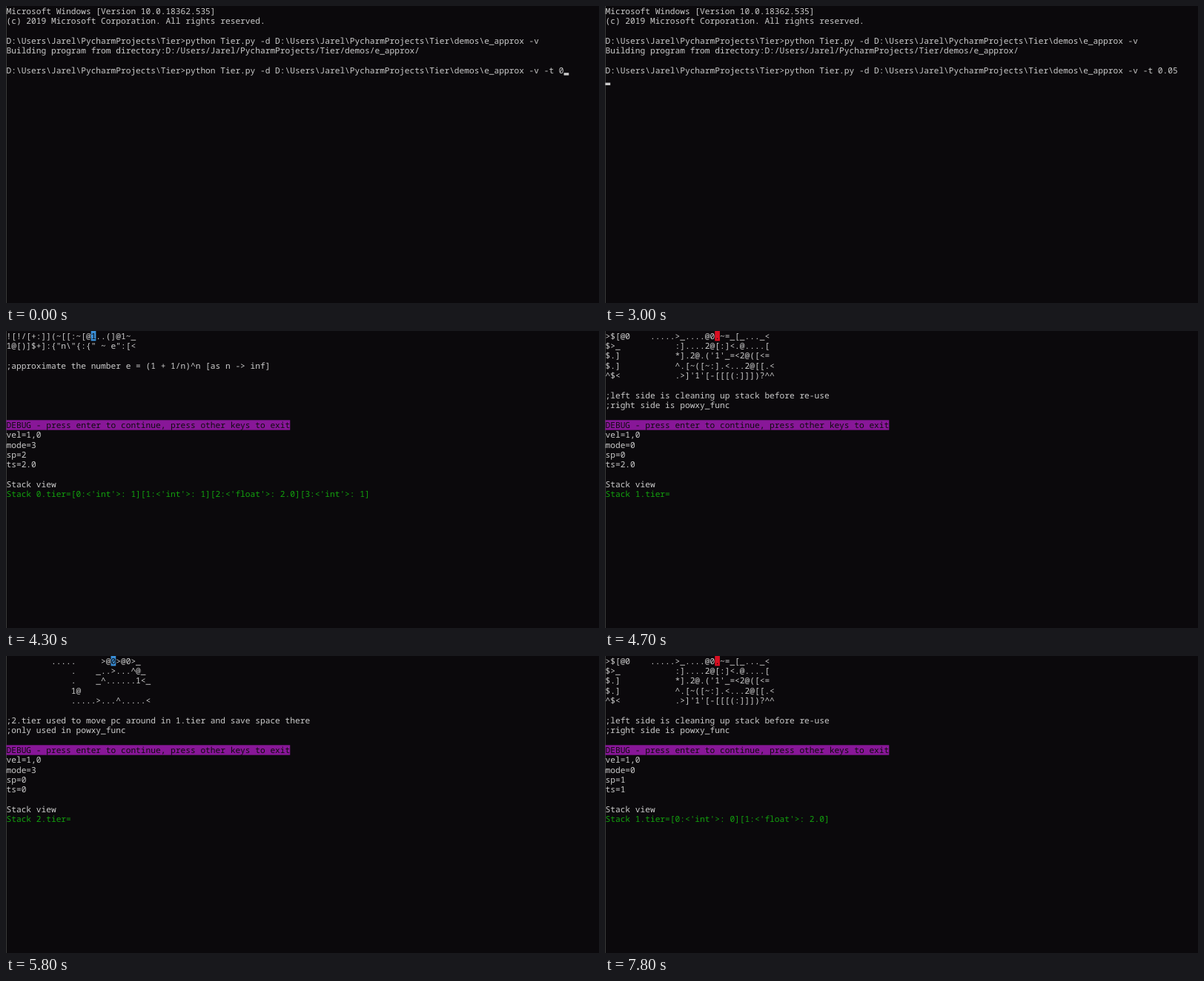
Write an HTML page with a canvas that moves like this. It is 800 by 401 pixels and loops after 8 s.

```html
<!DOCTYPE html>
<html lang="en">
<head>
<meta charset="utf-8">
<title>Tier debugger</title>
<style>
  html, body { margin: 0; width: 100%; height: 100%; overflow: hidden; background: #0b090c; }
  canvas { display: block; }
</style>
</head>
<body>
<canvas id="screen" width="800" height="401"></canvas>
<script>
const LOOP = 8000;
const CELL_W = 6.715, CELL_H = 401 / 30, LEFT = 0.5, BASELINE = 10.5;
const COLOR = {
  back: '#0b090c', edge: '#3a3a3a', text: '#cccccc', dark: '#0c0c0c',
  bar: '#881798', stack: '#13a10e', red: '#d90f22', blue: '#3a8fd8'
};

const ctx = document.getElementById('screen').getContext('2d');

const HOME = 'D:\\Users\\Jarel\\PycharmProjects\\Tier';
const COMMAND = `${HOME}>python Tier.py -d ${HOME}\\demos\\e_approx -v`;
const SHELL = [
  'Microsoft Windows [Version 10.0.18362.535]',
  '(c) 2019 Microsoft Corporation. All rights reserved.',
  '',
  COMMAND,
  `Building program from directory:${HOME.replaceAll('\\', '/')}/demos/e_approx/`
];

const pad = n => ' '.repeat(n);
const TIERS = [
  [
    '![!/[+:]](~[[:~[@1..(]@1~_',
    '1@[)]$+]:{"n\\"{:{" ~ e":[<',
    '',
    ';approximate the number e = (1 + 1/n)^n [as n -> inf]'
  ],
  [
    '>$[@0' + pad(4) + '.....>_....@0.~=_[_..._<',
    '$>_' + pad(11) + ':]....2@[:]<.@....[',
    '$.]' + pad(11) + "*].2@.('1'_=<2@([<=",
    '$.]' + pad(11) + '^.[~([~:].<...2@[[.<',
    '^$<' + pad(11) + ".>]'1'[-[[[(:]]])?^^",
    '',
    ';left side is cleaning up stack before re-use',
    ';right side is powxy_func'
  ],
  [
    pad(9) + '.....' + pad(5) + '>@0>@0>_',
    pad(13) + '.' + pad(4) + '_..>...^@_',
    pad(13) + '.' + pad(4) + '_^......1<_',
    pad(13) + '1@',
    pad(13) + '.....>...^.....<',
    '',
    ';2.tier used to move pc around in 1.tier and save space there',
    ';only used in powxy_func'
  ]
];

// Typed text and cursor blinks: [start, argument, cursor shown]
const TYPING = [
  [0, '0', true], [100, '0.', true], [200, '0.', false], [700, '0.', true],
  [800, '0.0', true], [1200, '0.0', false], [1700, '0.0', true],
  [1900, '0.05', true], [2200, '0.05', false], [2700, '0.05', true]
];
const ENTER = 3000;

// Debugger runs; the counter advances dx cells every 100 ms
const MAIN = ['1', '1', '2.0', '1'], POWER = ['0', '2.0'];
const RUNS = [
  { at: 3200, tier: 0, col: 1, row: 0, dx: 2, sp: 1, ts: '0', stack: MAIN, grow: true },
  { at: 3700, tier: 0, col: 11, row: 0, dx: 1, sp: 1, ts: '0', stack: MAIN },
  { at: 4000, tier: 0, col: 14, row: 0, dx: 1, sp: 2, ts: '2.0', stack: MAIN },
  { at: 4400, tier: 1, col: 18, row: 0, dx: 1, sp: 0, ts: '2.0', stack: [] },
  { at: 4700, tier: 1, col: 22, row: 0, dx: 1, sp: 0, ts: '2.0', stack: [] },
  { at: 5100, tier: 1, col: 25, row: 1, dx: -1, sp: 0, ts: '0', stack: ['0'] },
  { at: 5600, tier: 2, col: 19, row: 0, dx: 1, sp: 0, ts: '0', stack: [] },
  { at: 5900, tier: 0, col: 22, row: 0, dx: 1, sp: 3, ts: '1', stack: MAIN },
  { at: 6100, tier: 1, col: 24, row: 0, dx: 1, sp: 1, ts: '1', stack: POWER },
  { at: 6300, tier: 1, col: 25, row: 1, dx: -1, sp: 1, ts: '1', stack: POWER },
  { at: 6600, tier: 1, col: 22, row: 0, dx: 0, sp: 1, ts: '1', stack: POWER }
];

function print(text, row, color = COLOR.text, col = 0) {
  ctx.fillStyle = color;
  [...text].forEach((char, i) => {
    if (char !== ' ') ctx.fillText(char, LEFT + (col + i) * CELL_W, row * CELL_H + BASELINE);
  });
}

function block(col, row, count, color) {
  ctx.fillStyle = color;
  ctx.fillRect(LEFT + col * CELL_W, row * CELL_H, count * CELL_W, CELL_H);
}

function cursor(col, row) {
  const height = CELL_H / 4;
  ctx.fillStyle = COLOR.text;
  ctx.fillRect(LEFT + col * CELL_W, (row + 1) * CELL_H - height, CELL_W, height);
}

function drawShell(t) {
  const [, argument, shown] = TYPING.findLast(step => step[0] <= t);
  const line = `${COMMAND} -t ${argument}`;
  SHELL.forEach((text, row) => print(text, row));
  print(line, 6);
  if (t >= ENTER) cursor(0, 7);
  else if (shown) cursor(line.length, 6);
}

function stackText(values) {
  return values.map((value, i) =>
    `[${i}:<'${value.includes('.') ? 'float' : 'int'}'>: ${value}]`).join('');
}

function drawDebugger(t) {
  const run = RUNS.findLast(r => r.at <= t);
  const { tier, row, dx, sp, ts } = run;
  const col = run.col + dx * Math.floor((t - run.at) / 100);
  const code = TIERS[tier];
  const mode = code[row][col - Math.sign(dx)] === '@' ? 3 : 0;
  const stack = run.grow ? run.stack.slice(0, 1 + Math.floor(col / 3)) : run.stack;

  code.forEach((text, i) => {
    if (i !== row) return print(text, i);
    print(text.slice(0, col), i);
    print(text.slice(col + 1), i, COLOR.text, col + 1);
  });
  block(col, row, 1, mode ? COLOR.blue : COLOR.red);
  print(code[row][col], row, COLOR.dark, col);

  const banner = 'DEBUG - press enter to continue, press other keys to exit';
  block(0, 9, banner.length, COLOR.bar);
  print(banner, 9, COLOR.dark);
  [`vel=${dx < 0 ? -1 : 1},0`, `mode=${mode}`, `sp=${sp}`, `ts=${ts}`, '', 'Stack view']
    .forEach((text, i) => print(text, 10 + i));
  print(`Stack ${tier}.tier=${stackText(stack)}`, 16, COLOR.stack);
}

function draw(t) {
  ctx.font = '11.19px "Noto Sans Mono", "DejaVu Sans Mono", monospace';
  ctx.textRendering = 'geometricPrecision';
  ctx.fillStyle = COLOR.back;
  ctx.fillRect(0, 0, 800, 401);
  ctx.fillStyle = COLOR.edge;
  ctx.fillRect(0, 0, 1, 401);
  if (t < RUNS[0].at) drawShell(t);
  else drawDebugger(t);
}

const start = performance.now();
function tick() {
  draw((performance.now() - start) % LOOP);
  requestAnimationFrame(tick);
}
tick();
</script>
</body>
</html>
```
